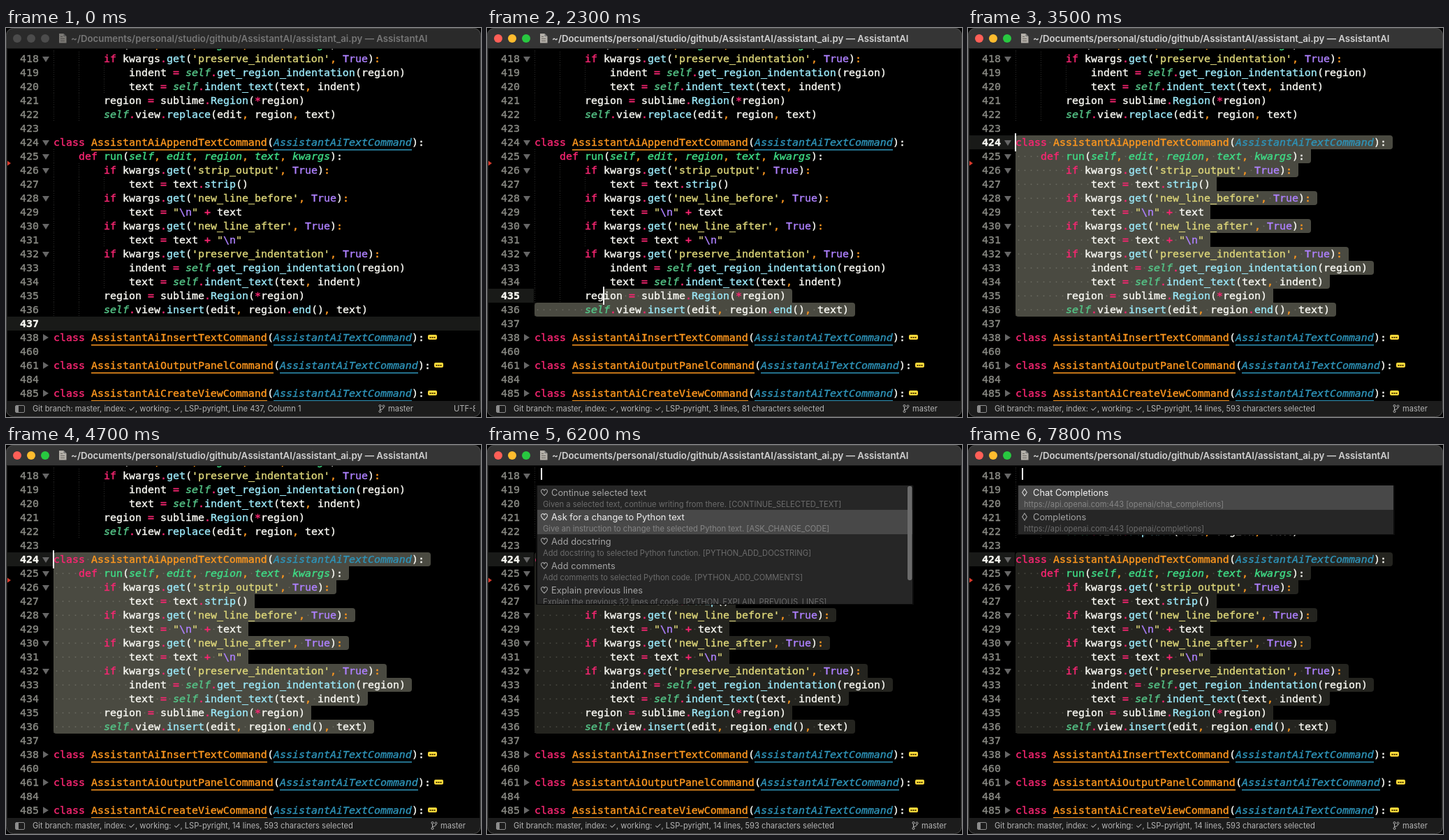
Animation of 680 by 558 pixels, one loop 8000 ms. Source, as an HTML page:

```html
<!DOCTYPE html>
<html lang="en">
<head>
<meta charset="utf-8">
<title>Editor selection</title>
<style>
  html, body { margin: 0; width: 100%; height: 100%; overflow: hidden; background: #000; }
  svg { display: block; }
  .code { font-family: "DejaVu Sans Mono", monospace; font-size: 14.95px; stroke-width: .4px; }
  .italic { font-style: italic; }
  .current { font-weight: 700; }
  .ui { font-family: Inter, "DejaVu Sans", sans-serif; }
</style>
</head>
<body>
<svg id="stage" width="680" height="558" viewBox="0 0 680 558"></svg>
<script>
const LOOP = 8000, LEFT = 68, CHAR = 9, ROW = 20;
const stage = document.getElementById('stage');

const color = {
  plain: '#f8f8f2', keyword: '#f92672', string: '#dcd579', constant: '#ae81ff',
  call: '#9be8f8', self: '#55c487', param: '#3fdc86', punct: '#fd971f',
  className: '#fd971f', parent: '#2e93b8', number: '#8a8b85'
};

const source = String.raw`417|    def run(self, edit, region, text, kwargs):
418|        if kwargs.get('preserve_indentation', True):
419|            indent = self.get_region_indentation(region)
420|            text = self.indent_text(text, indent)
421|        region = sublime.Region(*region)
422|        self.view.replace(edit, region, text)
423|
424|class AssistantAiAppendTextCommand(AssistantAiTextCommand):
425|    def run(self, edit, region, text, kwargs):
426|        if kwargs.get('strip_output', True):
427|            text = text.strip()
428|        if kwargs.get('new_line_before', True):
429|            text = "\n" + text
430|        if kwargs.get('new_line_after', True):
431|            text = text + "\n"
432|        if kwargs.get('preserve_indentation', True):
433|            indent = self.get_region_indentation(region)
434|            text = self.indent_text(text, indent)
435|        region = sublime.Region(*region)
436|        self.view.insert(edit, region.end(), text)
437|
438|class AssistantAiInsertTextCommand(AssistantAiTextCommand):
460|
461|class AssistantAiOutputPanelCommand(AssistantAiTextCommand):
484|
485|class AssistantAiCreateViewCommand(AssistantAiTextCommand):`;

const rows = source.split('\n').map((line, i) => {
  const [number, text] = line.split('|');
  return { number: +number, text, y: 24 + i * ROW };
});
const rowOf = number => rows.find(r => r.number === number);
const colX = col => LEFT + col * CHAR;

function add(parent, tag, attrs = {}, text) {
  const node = document.createElementNS('http://www.w3.org/2000/svg', tag);
  for (const k in attrs) node.setAttribute(k, attrs[k]);
  if (text !== undefined) node.textContent = text;
  parent.appendChild(node);
  return node;
}
const set = (node, attrs) => { for (const k in attrs) node.setAttribute(k, attrs[k]); };
const show = (node, on) => set(node, { visibility: on ? 'visible' : 'hidden' });
const group = (parent = stage) => add(parent, 'g');
const rect = (parent, x, y, width, height, fill, rx = 0) =>
  add(parent, 'rect', { x, y, width, height, fill, rx });
const label = (parent, x, y, text, size, fill, weight = 400) =>
  add(parent, 'text', { x, y, fill, class: 'ui', 'font-size': size, 'font-weight': weight }, text);
const mono = (parent, x, y, text, fill, italic) =>
  add(parent, 'text', { x, y, fill, stroke: fill, class: italic ? 'code italic' : 'code' }, text);

// Splits a line into coloured tokens
function tokens(text) {
  const inDef = /^\s*def/.test(text), inClass = /^class/.test(text);
  const out = [];
  for (const m of text.matchAll(/'[^']*'|\\n|"|\w+|[^\s\w]/g)) {
    const s = m[0], called = text[m.index + s.length] === '(';
    let kind = 'plain';
    if (/^(if|class|def)$/.test(s) || /^[=+*.]$/.test(s)) kind = 'keyword';
    else if (/^['"]/.test(s)) kind = 'string';
    else if (s === '\\n' || s === 'True') kind = 'constant';
    else if (inClass && /\w/.test(s)) kind = called ? 'className' : 'parent';
    else if (inDef && /\w/.test(s)) kind = 'param';
    else if (s === 'self') kind = 'self';
    else if (called) kind = 'call';
    else if (s === ',' || (s === ':' && !inClass && !inDef)) kind = 'punct';
    const italic = kind === 'self' || kind === 'parent' || (kind === 'param' && !called);
    out.push({ s, kind, col: m.index, italic });
  }
  return out;
}

// Editor
rect(stage, 0, 0, 680, 558, '#000');
const lineBack = rect(stage, 2, 0, 675, ROW, '#191a18');
const guides = group();
const selection = group();
const codeLayer = group();
const gutter = group();
const underlines424 = group();
const numbers = {};

for (const r of rows) {
  const indent = r.text.search(/\S/);
  for (let c = 0; c < indent; c += 4)
    add(guides, 'line', { x1: colX(c) + .5, x2: colX(c) + .5, y1: r.y - 10, y2: r.y + 10,
      stroke: '#2c2c2a', 'stroke-dasharray': '1 2' });
  for (const t of tokens(r.text)) {
    mono(codeLayer, colX(t.col), r.y + 5, t.s, color[t.kind], t.italic);
    if (t.kind === 'className' || t.kind === 'parent')
      rect(r.number === 424 ? underlines424 : codeLayer,
        colX(t.col), r.y + 10, t.s.length * CHAR, 1.5, color[t.kind]);
  }
  numbers[r.number] = mono(gutter, 20, r.y + 5, r.number, color.number);
  const folded = r.number > 437 && r.text;
  if (folded) {
    const x = colX(r.text.length) + 5;
    rect(codeLayer, x, r.y - 4, 13, 7, '#ffd83a', 2);
    for (let i = 0; i < 3; i++) rect(codeLayer, x + 2.5 + i * 3, r.y - 1, 2, 2, '#4a3d00');
    add(gutter, 'path', { d: `M53 ${r.y - 5}l8 5l-8 5z`, fill: '#666' });
  } else if (/:$/.test(r.text)) {
    add(gutter, 'path', { d: `M52 ${r.y - 3}h10l-5 8z`, fill: '#666' });
  }
}
add(gutter, 'path', { d: 'M2 190.500l5 3.500l-5 3.500z', fill: '#d8392b' });
const caret = rect(stage, 0, 0, 2, 26, '#fff');

// Popups
const heart = 'M5 9.500C2 7 .5 5.300 .5 3.200C.5 .2 4 -.2 5 2.200C6 -.2 9.500 .2 9.500 3.200C9.500 5.300 8 7 5 9.500z';
const lozenge = 'M4 0l3.300 5l-3.300 5l-3.300 -5z';

function makePopup(items, height, icon, titleX) {
  const g = group();
  rect(g, 70, 30, 541, 28, '#000');
  rect(g, 70, 58, 541, height + 1, '#0b0b0b');
  const clipId = 'clip' + height;
  const clip = add(g, 'clipPath', { id: clipId });
  rect(clip, 72, 58, 537, height, '#fff');
  const list = add(g, 'g', { 'clip-path': `url(#${clipId})` });
  const entries = items.map(([title, detail], i) => {
    const y = 58 + i * 35;
    return {
      back: rect(list, 72, y, 537, 35, '#262626'),
      icon: add(list, 'path', { d: icon, transform: `translate(77 ${y + 5})`, fill: 'none', 'stroke-width': 1.1 }),
      title: label(list, titleX, y + 14.5, title, 12.85, '#a4a4a4'),
      detail: label(list, 80, y + 31, detail, 11.17, '#6c6c6c')
    };
  });
  const select = index => entries.forEach((e, i) => {
    const on = i === index;
    set(e.back, { fill: on ? '#484848' : '#262626' });
    set(e.icon, { stroke: on ? '#dcdcdc' : '#a4a4a4' });
    set(e.title, { fill: on ? '#f0f0f0' : '#a4a4a4' });
    set(e.detail, { fill: on ? '#858585' : '#6c6c6c' });
  });
  return { g, select };
}

const actions = makePopup([
  ['Continue selected text', 'Given a selected text, continue writing from there. [CONTINUE_SELECTED_TEXT]'],
  ['Ask for a change to Python text', 'Give an instruction to change the selected Python text. [ASK_CHANGE_CODE]'],
  ['Add docstring', 'Add docstring to selected Python function. [PYTHON_ADD_DOCSTRING]'],
  ['Add comments', 'Add comments to selected Python code. [PYTHON_ADD_COMMENTS]'],
  ['Explain previous lines', 'Explain the previous 32 lines of code. [PYTHON_EXPLAIN_PREVIOUS_LINES]']
], 170, heart, 92);
const scrollbar = rect(actions.g, 602, 59, 6.5, 135, '#6b6b6b', 3);
const endpoints = makePopup([
  ['Chat Completions', 'https://api.openai.com:443 [openai/chat_completions]'],
  ['Completions', 'https://api.openai.com:443 [openai/completions]']
], 70, lozenge, 93);
endpoints.select(0);
const inputCaret = rect(stage, 77, 33, 2, 17, '#fff');

// Window frame
const titleBar = rect(stage, 0, 0, 680, 29, '#353535');
rect(stage, 0, 29, 680, 1, '#111');
const lights = [16, 36, 56].map(cx => add(stage, 'circle', { cx, cy: 15, r: 6 }));
const fileIcon = group();
add(fileIcon, 'path', { d: 'M76 8h6.500l4 4v9.500h-10.500z', fill: '#c9c5bd' });
add(fileIcon, 'path', { d: 'M82.500 8v4h4z', fill: '#858585' });
for (let y = 12; y < 20; y += 3) rect(fileIcon, 78, y, y < 13 ? 3 : 6, 1, '#77736c');
const title = label(stage, 93, 19.5,
  '~/Documents/personal/studio/github/AssistantAI/assistant_ai.py — AssistantAI', 13.25, '#d2d2d2', 600);

rect(stage, 0, 535, 680, 23, '#1c1c1c');
add(stage, 'rect', { x: 13.5, y: 541.5, width: 13, height: 10, rx: 1.5, fill: 'none', stroke: '#8c8c8c' });
rect(stage, 14, 542, 4, 9, '#8c8c8c');
const status = label(stage, 38, 550, '', 11.12, '#b4b4b4');
const branch = group();
add(branch, 'path', { d: 'M2.500 543.500v5M7.500 544v1q0 2 -5 2.500', fill: 'none', stroke: '#b4b4b4' });
for (const [cx, cy] of [[2.5, 542], [2.5, 550], [7.5, 542.5]])
  add(branch, 'circle', { cx, cy, r: 1.5, fill: 'none', stroke: '#b4b4b4' });
label(branch, 14, 550, 'master', 11.12, '#b4b4b4');
label(branch, 108, 550, 'UTF-8', 11.12, '#b4b4b4');
rect(stage, 671.5, 536, 8, 20, '#1c1c1c');
rect(stage, 678, 30, 2, 528, '#1c1c1c');
rect(stage, 0, 30, 2, 528, '#1c1c1c');
add(stage, 'path', { d: 'M0 0h680v558h-680zM10 0a10 10 0 0 0 -10 10v538a10 10 0 0 0 10 10h660a10 10 0 0 0 10 -10v-538a10 10 0 0 0 -10 -10z',
  fill: '#000', 'fill-rule': 'evenodd' });
add(stage, 'rect', { x: .5, y: .5, width: 679, height: 557, rx: 10, fill: 'none', stroke: '#4b4b4b' });

// Timeline: time, caret line, caret column
const drag = [
  [0, 437, 0], [1900, 436, 42], [2000, 436, 32], [2100, 436, 22], [2200, 435, 18], [2300, 435, 11],
  [2400, 434, 7], [2500, 432, 4], [2600, 429, 0], [2700, 426, 0], [2800, 425, 0], [2900, 424, 0]
];
const FOCUS = 800, OPEN = 4800, SECOND_ROW = 6000, SWITCH = 7500;
const caretResets = [FOCUS, 1900, 2300, 2700, 2900, 3500];
const inputResets = [5000, SWITCH];

const clamp = v => Math.max(0, Math.min(1, v));
const blink = age => age < 200 ? 1 : clamp(.5 + .7 * Math.cos((age - 200) * Math.PI / 500));
const lastReset = (list, t) => list.filter(v => v <= t).pop() ?? t;

function drawSelection(line, col, focused) {
  selection.replaceChildren();
  const picked = rows.filter(r => r.number >= line && r.number < 437);
  const spans = picked.map(r => {
    const from = r.number === line ? Math.min(col, r.text.length) : 0;
    return { r, from, to: r.text.length + 1 };
  });
  const fill = focused ? '#4a4a41' : '#24241f';
  const dot = focused ? '#6b6b61' : '#4a4a43';
  spans.forEach((s, i) => {
    const prev = spans[i - 1], next = spans[i + 1];
    const x0 = colX(s.from), x1 = colX(s.to), y = s.r.y - 10, R = 4;
    const tl = !prev || prev.from > s.from ? R : 0, bl = next ? 0 : R;
    const tr = !prev || prev.to < s.to ? R : 0, br = !next || next.to < s.to ? R : 0;
    add(selection, 'path', { fill, d: `M${x0 + tl} ${y}H${x1 - tr}q${tr} 0 ${tr} ${tr}V${y + ROW - br}` +
      `q0 ${br} ${-br} ${br}H${x0 + bl}q${-bl} 0 ${-bl} ${-bl}V${y + tl}q0 ${-tl} ${tl} ${-tl}z` });
    for (let c = s.from; c < s.r.text.length; c++)
      if (s.r.text[c] === ' ') rect(selection, colX(c) + 3.7, s.r.y - .5, 1.6, 1.6, dot);
  });
  const chars = spans.reduce((sum, s) => sum + s.to - s.from, 0);
  return { lines: spans.length + 1, chars };
}

function drawState(line, col, active, popup) {
  const empty = line === 437;
  const { lines, chars } = drawSelection(line, col, !popup);
  const y = rowOf(line).y;
  set(lineBack, { y: y - 10, width: empty ? 676 : 65 });
  for (const n in numbers) {
    const on = +n === line, fill = on ? color.plain : color.number;
    set(numbers[n], { fill, stroke: fill, class: on ? 'code current' : 'code' });
  }
  show(underlines424, line > 424);
  set(caret, { x: colX(col) - 1, y: y - 13 });
  status.textContent = 'Git branch: master, index: ✓, working: ✓, LSP-pyright, ' +
    (empty ? 'Line 437, Column 1' : `${lines} lines, ${chars} characters selected`);
  const digits = `${lines}${chars}`.length;
  set(branch, { transform: `translate(${empty ? 533 : 575.5 + 6.5 * digits} 0)` });

  const lit = ['#ff5f57', '#febc2e', '#28c840'];
  lights.forEach((l, i) => set(l, { fill: active ? lit[i] : '#4c4c4c' }));
  set(title, { fill: active ? '#d2d2d2' : '#767676' });
  set(titleBar, { fill: active ? '#353535' : '#2a2a2a' });
  set(fileIcon, { opacity: active ? .85 : .5 });
  show(actions.g, popup === 1 || popup === 2);
  show(endpoints.g, popup === 3);
  if (popup) actions.select(popup - 1);
}

let lastKey = '';
function draw(t) {
  const [, line, col] = drag.filter(d => d[0] <= t).pop();
  const popup = t < OPEN ? 0 : t < SECOND_ROW ? 1 : t < SWITCH ? 2 : 3;
  const active = t >= FOCUS;
  const key = [line, col, active, popup].join();
  if (key !== lastKey) drawState(line, col, active, popup);
  lastKey = key;
  set(caret, { opacity: active && !popup ? blink(t - lastReset(caretResets, t)) : 0 });
  set(inputCaret, { opacity: popup ? blink(t - lastReset(inputResets, t)) : 0 });
  set(scrollbar, { opacity: clamp((t - 5700) / 300) });
}

const start = performance.now();
function tick() {
  draw((performance.now() - start) % LOOP);
  requestAnimationFrame(tick);
}
tick();
</script>
</body>
</html>
```
